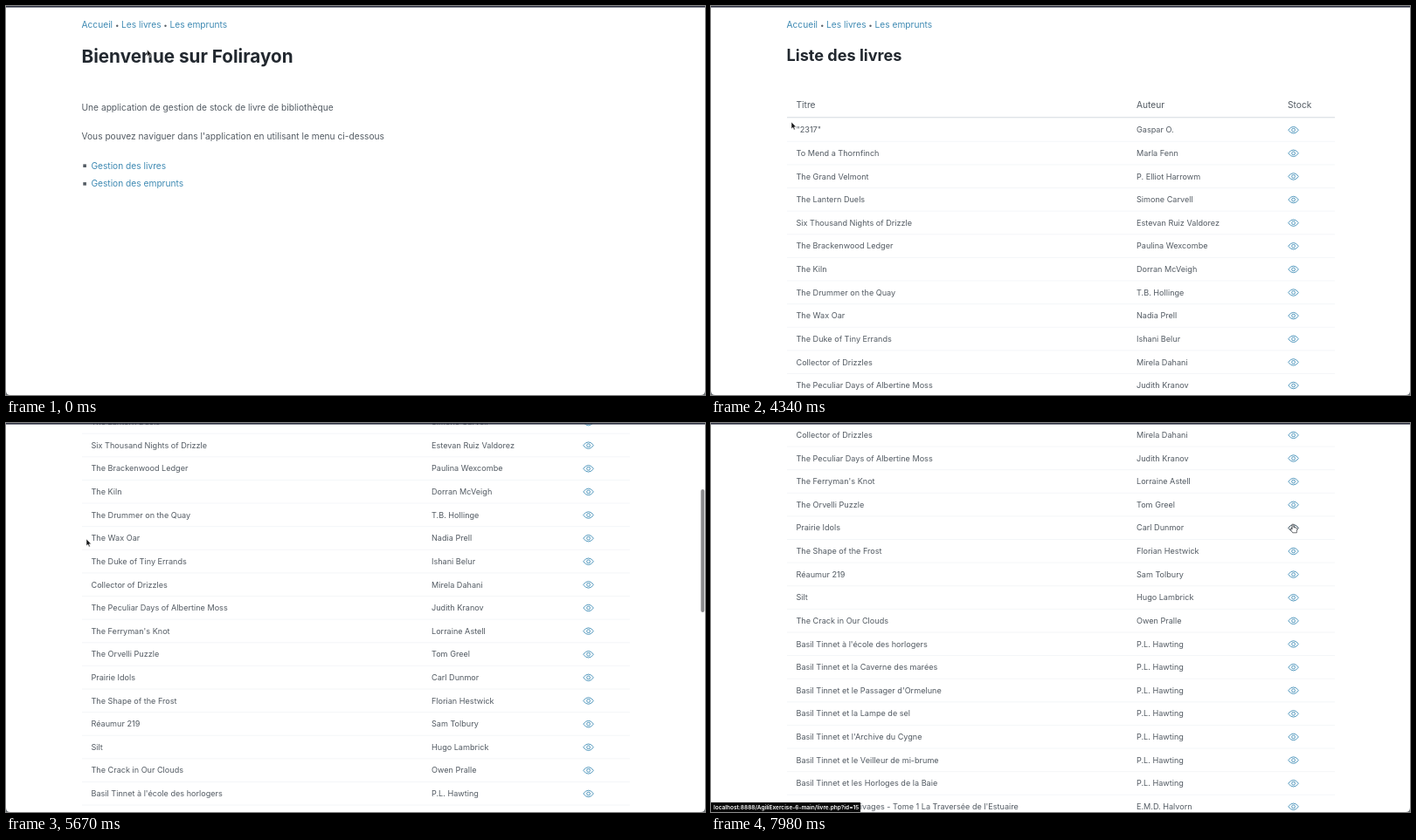
Animation, 800 px wide and 446 px high, one loop 8000 ms. Source, as an HTML page:

```html
<!DOCTYPE html>
<html lang="fr">
<head>
<meta charset="utf-8">
<title>Gestion de livres</title>
<style>
html, body { margin: 0; width: 100%; height: 100%; overflow: hidden; background: #fff; }
svg { display: block; width: 800px; height: 446px; font: 10.2px Inter, "Open Sans", sans-serif; fill: #535b63; }
.h { font-weight: 700; fill: #22282f; }
.link { fill: #3f8ab3; }
.cell { font-size: 9.1px; }
.eye { fill: none; stroke: #4b94bb; stroke-width: .95; }
.eye.hover { stroke: #2b4453; }
.rule { stroke: #e9edf0; stroke-width: .5; }
</style>
</head>
<body>
<svg id="stage" viewBox="0 0 800 446"></svg>
<script>
const LOOP = 8000, STEP = 70;
const ROW_Y = 142, ROW_H = 26.62, CLICK = 2800, HOVER_ROW = 14;

const hero = "Basil Tinnet ";
const saga = ["à l'école des horlogers", "et la Caverne des marées", "et le Passager d'Ormelune",
  "et la Lampe de sel", "et l'Archive du Cygne", "et le Veilleur de mi-brume",
  "et les Horloges de la Baie"].map(part => [hero + part, "P.L. Hawting"]);

const books = [
  ['"2317"', "Gaspar O."],
  ["To Mend a Thornfinch", "Marla Fenn"],
  ["The Grand Velmont", "P. Elliot Harrowm"],
  ["The Lantern Duels", "Simone Carvell"],
  ["Six Thousand Nights of Drizzle", "Estevan Ruiz Valdorez"],
  ["The Brackenwood Ledger", "Paulina Wexcombe"],
  ["The Kiln", "Dorran McVeigh"],
  ["The Drummer on the Quay", "T.B. Hollinge"],
  ["The Wax Oar", "Nadia Prell"],
  ["The Duke of Tiny Errands", "Ishani Belur"],
  ["Collector of Drizzles", "Mirela Dahani"],
  ["The Peculiar Days of Albertine Moss", "Judith Kranov"],
  ["The Ferryman's Knot", "Lorraine Astell"],
  ["The Orvelli Puzzle", "Tom Greel"],
  ["Prairie Idols", "Carl Dunmor"],
  ["The Shape of the Frost", "Florian Hestwick"],
  ["Réaumur 219", "Sam Tolbury"],
  ["Silt", "Hugo Lambrick"],
  ["The Crack in Our Clouds", "Owen Pralle"],
  ...saga,
  ["Le Gardien des Rivages - Tome 1 La Traversée de l'Estuaire", "E.M.D. Halvorn"]
];

const text = (x, y, s, cls = "", size = "") =>
  `<text x="${x}" y="${y}" class="${cls}"${size && ` font-size="${size}"`}>${s}</text>`;
const rule = (y, extra = "") => `<path class="rule" d="M87 ${y}H714" ${extra}/>`;
const eye = (y, id) => `<g class="eye" id="eye${id}" transform="translate(666.6 ${y})">
  <path d="M-5.8 0Q-3.4-3.8 0-3.8T5.8 0Q3.4 3.8 0 3.8T-5.8 0Z"/><circle r="1.9"/></g>`;

const nav = text(86.5, 25.2, "Accueil", "link") + text(125, 25.2, "•", "", 8) +
  text(132, 25.2, "Les livres", "link") + text(180.3, 25.2, "•", "", 8) +
  text(187.5, 25.2, "Les emprunts", "link");

const item = (y, s) => `<rect x="88.3" y="${y - 1.6}" width="3.6" height="3.6"/>` +
  text(97.4, y + 3.6, s, "link");

const home = nav + text(86.5, 65.4, "Bienvenue sur Folirayon", "h", 20.7) +
  text(86.5, 119.8, "Une application de gestion de stock de livre de bibliothèque") +
  text(86.5, 153, "Vous pouvez naviguer dans l'application en utilisant le menu ci-dessous") +
  item(183, "Gestion des livres") + item(203.7, "Gestion des emprunts");

const list = nav + text(86.5, 62.6, "Liste des livres", "h", 18.1) +
  text(97.5, 117.2, "Titre") + text(487, 117.2, "Auteur") + text(660, 117.2, "Stock") +
  rule(127.8, 'style="stroke:#d3d9de;stroke-width:1"') +
  books.map(([title, author], i) => {
    const y = ROW_Y + i * ROW_H;
    return text(97.5, y + 3.3, title, "cell") + text(487, y + 3.3, author, "cell") +
      eye(y + .2, i) + rule(y + ROW_H / 2);
  }).join("");

const $ = id => document.getElementById(id);
$("stage").innerHTML = `
  <rect width="800" height="446" fill="#fff"/>
  <g id="home">${home}</g>
  <g id="list">${list}</g>
  <rect id="thumb" x="795.3" width="4" height="141" rx="2" fill="#8b8b8d"/>
  <rect width="800" height="1.6" fill="#2c2f3f"/>
  <path d="M0 441Q0 446 5 446H0ZM800 441Q800 446 795 446H800Z" fill="#6d7377"/>
  <g id="status"><rect y="435" width="171" height="11" fill="#050505"/>
    <text x="3" y="442.9" font-size="6.5" font-weight="600" fill="#fff">localhost:8888/AgiliExercise-6-main/livre.php?id=15</text></g>
  <path id="arrow" d="M0 0V7.8L1.8 6.2 3 8.9 4.3 8.4 3.1 5.8H5.5Z" fill="#17181a" stroke="#fff" stroke-width=".5"/>
  <path id="hand" d="M-.9.8a.9.9 0 0 1 1.8 0V3.6l3.2.7q1 .3.9 1.4l-.6 2.6v1.5h-4.7l-2.7-3.8q-.4-1.1.8-.9l1.3.8Z"
    fill="#fff" stroke="#3a3c40" stroke-width=".75"/>`;

// Keys are [time, value]; values hold before the first and after the last key.
const lerp = (a, b, k) => a + (b - a) * k;
const smooth = k => k * k * (3 - 2 * k);
function track(keys, t, ease = k => k) {
  if (t <= keys[0][0]) return keys[0][1];
  for (let i = 1; i < keys.length; i++) {
    const [t0, a] = keys[i - 1], [t1, b] = keys[i];
    if (t < t1) return lerp(a, b, ease((t - t0) / (t1 - t0)));
  }
  return keys[keys.length - 1][1];
}

const scrollKeys = [[4620, 0], [5180, 129], [5670, 223], [6160, 345.6], [6580, 394.5]];
const thumbKeys = [[4550, 0], [4690, 1], [6980, 1], [7260, 0]];
const xKeys = [[1400, 161.5], [2000, 145.3], [3100, 145.3], [3800, 92], [6760, 92], [7420, 666]];
const yKeys = [[1400, 50], [2000, 28.3], [3100, 28.3], [3800, 133], [6760, 133], [7420, 116]];

const show = (id, on) => $(id).setAttribute("visibility", on ? "visible" : "hidden");
const move = (id, x, y) => $(id).setAttribute("transform", `translate(${x} ${y})`);

function draw(time) {
  const t = Math.floor(time / STEP) * STEP;
  const scroll = track(scrollKeys, t);
  const x = track(xKeys, t, smooth), y = track(yKeys, t, smooth);
  const onEye = t >= 7400;
  const onLink = onEye || (t >= 1950 && t < 3200);

  show("home", t < CLICK);
  show("list", t >= CLICK);
  move("list", 0, -scroll);
  $("thumb").setAttribute("y", 2.8 + scroll * .328);
  $("thumb").setAttribute("opacity", track(thumbKeys, t));
  show("status", t >= 7560);
  $("eye" + HOVER_ROW).classList.toggle("hover", onEye);
  show("arrow", !onLink);
  show("hand", onLink);
  move("arrow", x, y);
  move("hand", x, y);
}

const start = performance.now();
function tick() {
  draw((performance.now() - start) % LOOP);
  requestAnimationFrame(tick);
}
tick();
</script>
</body>
</html>
```
